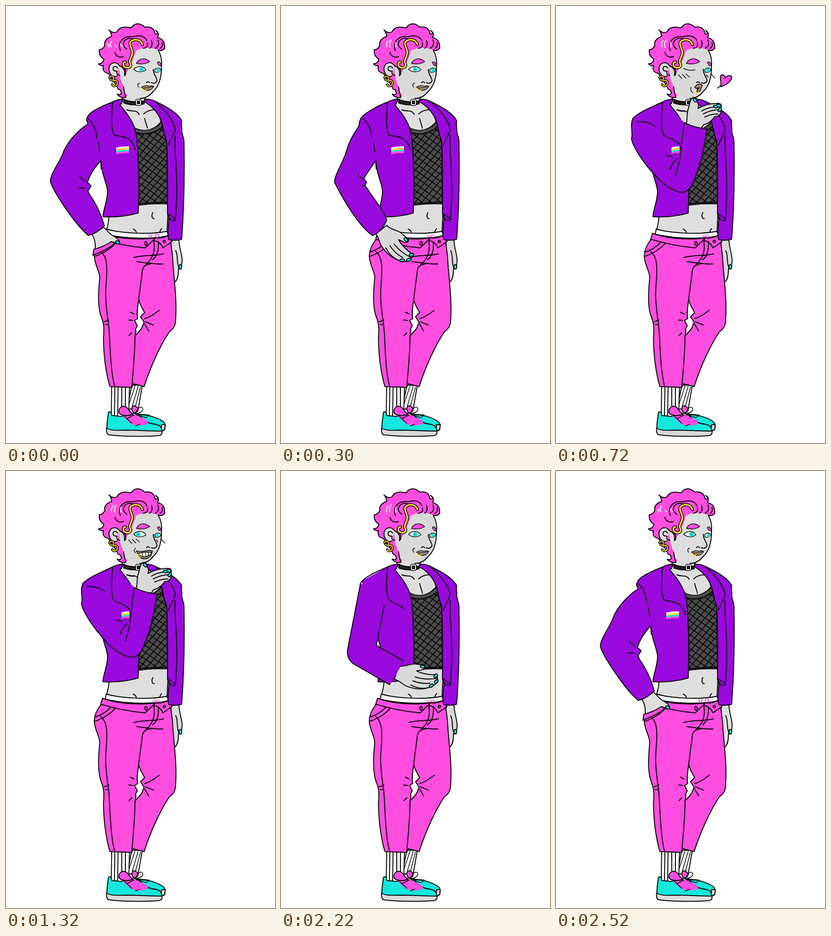
An HTML page for the animation above (2.88 s loop, 588 px wide and 952 px high).

```html
<!DOCTYPE html>
<html lang="en">
<head>
<meta charset="utf-8">
<title>Blown kiss</title>
<style>
html,body{margin:0;width:100%;height:100%;overflow:hidden;background:#fff}
svg{display:block;width:100vw;height:100vh}
text{font-family:"DejaVu Sans",Inter,sans-serif}
</style>
</head>
<body>
<svg id="stage" viewBox="0 0 588 952" fill="none" stroke="#000" stroke-width="2" stroke-linecap="round" stroke-linejoin="round"></svg>
<script>
const PINK = '#ff4de0', PURPLE = '#9a09dd', CYAN = '#12e8dc', GOLD = '#ffe32e', LIP = '#a08b72';
const LOOP = 2880, STEP = 60;
const THIN = 'stroke-width="1.5"', BARE = 'stroke="none"';
const stage = document.getElementById('stage');
let skin = '#d9d9d9';

const shape = (d, fill = 'none', extra = '') => `<path d="${d}" fill="${fill}" ${extra}/>`;
const flat = (d, fill) => shape(d, fill, BARE);
const dot = (x, y, rx, ry, fill, extra = '') => `<ellipse cx="${x}" cy="${y}" rx="${rx}" ry="${ry}" fill="${fill}" ${extra}/>`;
const nail = (x, y, a = 0) => dot(x, y, 5, 3, CYAN, `transform="rotate(${a} ${x} ${y})"`);
const gold = (d, w) => shape(d, 'none', `stroke="${GOLD}" stroke-width="${w}"`);
const cord = (d, w) => shape(d, 'none', `stroke-width="${w + 3}"`) + gold(d, w);
const group = (inner, transform) => `<g transform="${transform}">${inner}</g>`;

// Blend two paths that share the same commands
function mix(a, b, k) {
  const to = b.match(/-?[\d.]+/g);
  let i = 0;
  return a.replace(/-?[\d.]+/g, n => (+n + (to[i++] - n) * k).toFixed(1));
}

const SLEEVE = {
  hip: 'M231 210C215 216 182 230 178 242C172 252 182 252 178 258C160 268 132 298 124 322C115 345 97 365 97 382C102 402 150 475 180 500C192 497 205 489 215 479C207 450 193 425 183 411L179 403L186 392L178 384C184 365 195 350 207 337M160 371L173 382M158 396L172 397',
  out: 'M231 210C215 216 182 230 178 242C172 252 182 254 178 260C160 268 132 298 124 322C115 345 98 367 98 382C108 412 130 470 145 494C158 496 177 486 189 474C182 450 180 425 179 409L173 403L179 396L172 388C178 368 192 350 206 337M160 380L173 387M156 399L172 399',
  front: 'M231 210C215 216 184 232 176 243C170 250 172 256 170 262C150 290 145 310 140 325C130 350 117 370 117 384C135 420 170 480 200 500C212 496 225 482 231 466C222 440 198 415 189 398L183 392L187 384L181 376C190 360 200 348 207 337M168 369L183 379M175 391L184 391'
};

function legs() {
  let s = shape('M361 508L378 510C379 530 385 540 385 555L383 573L377 572C377 588 375 598 368 602L363 596C360 560 360 535 361 508ZM371 533C377 545 372 558 378 570', skin);
  s += dot(381, 568, 3, 5, CYAN);
  s += shape('M275 826L298 826L289 878L265 878Z', '#fff') + shape('M282 828L268 870M289 828L276 872M294 830L283 872', 'none', THIN);
  s += shape('M231 828L230 895L268 895L270 828Z', '#fff') + shape('M238 831L237 892M245 831L244 892M253 831L253 888M261 831L261 880');
  s += shape('M290 890C315 890 345 901 348 912L347 923L335 929L300 915Z', CYAN) + shape('M340 912L348 912L347 922L339 927Z', skin);
  s += shape('M224 885C229 883 231 884 231 892L250 894L290 891C304 906 313 910 326 911C337 913 342 919 340 928L221 926C219 910 223 896 224 885Z', CYAN);
  s += shape('M220 919C224 924 240 925 258 924C285 924 315 926 341 926C342 932 340 935 334 936C300 938 255 938 224 934C220 932 219 925 220 919Z', skin);
  s += flat('M250 888C270 888 285 889 296 897Q315 903 309 911Q290 917 275 911Q265 904 250 888Z', PINK);
  s += shape('M247 886C245 872 260 867 267 878C272 886 278 889 278 889C268 894 251 893 247 886ZM279 887C271 876 277 867 285 873C294 882 285 886 279 887Z', PINK);
  s += shape('M285 884C288 876 296 870 299 877C300 883 292 888 282 888M281 888L313 891L306 897ZM257 892L275 909M264 899L280 891M283 915L292 911', 'none', THIN);

  s += shape('M209 507C195 524 191 540 194 553C198 572 204 578 205 591C202 620 200 650 207 674C214 690 215 702 213 722C213 762 219 802 227 829L275 831L278 823L302 829C316 785 338 738 357 710C368 702 371 695 371 680C374 635 366 590 364 545L360 514L300 500Z', PINK);
  s += shape('M290 640C294 655 301 663 303 668L294 677L302 689L296 703L282 719C284 710 285 706 283 704L287 697L281 685L288 681C285 670 288 655 290 640Z', '#fff');
  s += shape('M207 535C227 550 219 590 218 620C216 650 225 690 226 715C228 760 230 800 237 827M282 719C282 760 277 800 275 831M318 561C305 564 299 567 298 577C296 595 292 620 290 640');
  s += shape('M279 548C300 542 325 545 344 540M286 557C305 559 325 563 343 562M272 667L280 671M268 684L277 685M269 718L275 712M303 681C320 676 327 668 335 663M305 688L322 695M303 693L312 708M215 688L225 684M217 694L225 694');
  return s + shape('M194 536C207 533 220 524 229 515M195 545C211 540 228 529 238 518');
}

function waist(rest) {
  let s = shape('M226 450C225 465 223 478 220 486C260 498 315 498 352 491L355 430L285 430Z', '#dedede');
  s += shape('M321 450C317 457 320 465 324 463M285 493Q283 488 278 486M336 493Q337 488 340 485');
  s += shape('M219 486C255 496 315 498 352 491L355 500C330 508 260 508 217 497Z', '#fff');
  s += `<text x="${rest ? 311 : 320}" y="506" font-size="${rest ? 13 : 10}" font-weight="bold" letter-spacing="${rest ? 4 : 0}" fill="${PINK}" stroke="none" transform="rotate(-5 325 504)">VO</text>`;
  s += shape('M211 495C245 508 295 510 326 505L320 512C314 517 310 522 304 527C268 524 237 517 207 508Z', PINK);
  s += shape('M326 505C338 507 348 503 354 500L363 513L343 527C339 518 334 513 323 511Z', PINK);
  s += shape('M323 511C326 530 324 548 306 563M333 513C334 530 331 546 320 553');
  return s + dot(306, 517, 2.5, 4, PINK) + dot(346, 513, 2.5, 2.5, PINK);
}

function torso() {
  const tank = 'M275 259C288 276 320 276 339 252L352 290L353 431C330 430 310 431 289 434Z';
  let net = '';
  for (let i = 0; i < 24; i++) net += `M${130 + i * 15} 442l165 -190M270 ${175 + i * 15}l100 72`;
  let s = shape('M257 180L252 213L240 220L275 275L345 275L330 220L304 208L304 185Z', '#dedede');
  s += shape('M264 226C275 231 286 225 291 236M301 235C308 228 316 226 326 226M303 245C305 254 308 260 309 266');
  s += `<clipPath id="tank"><path d="${tank}"/></clipPath>` + shape(tank, '#4c4c4c');
  s += `<g clip-path="url(#tank)">${shape(net, 'none', 'stroke-width="1.7"')}${shape('M273 263C288 281 324 278 343 256', 'none', 'stroke="#4c4c4c" stroke-width="7"')}${shape('M273 268C290 285 326 281 344 260M287 430L355 427')}</g>`;
  return s;
}

function jacket() {
  let s = shape('M303 203C318 202 325 207 337 213C355 222 377 236 384 250C382 260 386 266 384 273L389 292C390 340 390 430 384 508C375 511 362 511 355 508C353 494 355 480 356 463L353 453C353 400 354 340 351 294C345 280 343 262 340 252C333 234 321 219 303 209Z', PURPLE);
  s += shape('M325 207C347 226 365 246 370 268C367 282 360 290 355 303M370 282C367 310 374 350 373 390C374 420 372 445 370 466L365 468C358 465 354 460 354 453L368 462');
  s += flat('M231 210L180 240L190 290L207 337L260 340Z', PURPLE);
  s += shape('M207 337C208 365 222 388 222 405C221 428 212 445 212 459C240 461 268 457 289 451C291 400 290 340 287 300C286 280 281 262 275 252C269 238 257 226 249 215L258 203C249 203 238 206 231 210', PURPLE);
  return s;
}

const flag = () => ['#fff', GOLD, CYAN, PINK].map((c, i) => flat(`M241 ${308.5 + i * 3.6}Q255 ${305 + i * 3.6} 269 ${306 + i * 3.6}v3.8Q255 ${309 + i * 3.6} 241 ${312.3 + i * 3.6}Z`, c)).join('');

function hair() {
  return shape('M262 199Q249 201 243 192Q252 195 252 189Q251 182 245 181Q243 175 238 168L224 147Q209 144 213 130Q206 131 202 126Q212 126 214 116Q202 109 204 95Q211 96 216 86Q213 73 231 66Q230 57 225 52Q234 61 243 56Q249 43 269 47Q275 49 278 42Q291 34 303 46Q323 43 326 61Q335 62 327 53Q337 59 331 69Q348 72 347 92Q341 99 333 96', PINK);
}

function head(face, rest) {
  let s = hair();
  s += flat('M258 135L262 140L270 128L283 98Q300 88 325 93L333 97C340 108 341 120 340 132C340 157 334 175 322 186C313 197 303 202 293 201C280 199 268 195 260 191L257 176L250 158L247 132Z', skin);
  s += shape('M333 97C340 108 341 120 340 132C340 157 334 175 322 186C313 197 303 202 293 201M258 137Q260 145 259 152M262 199C260 192 258 185 257 176');
  s += shape('M248 130C240 119 226 123 225 137C226 150 235 157 243 152', skin) + shape('M249 151Q240 150 243 142Q231 142 235 133Q239 129 244 135M248 130Q255 133 258 139');
  s += flat('M284 97C280 112 276 121 272 128L261 150L258 135L265 110Z', PINK);
  s += shape('M250 97C243 82 254 63 278 67C291 63 304 65 308 76M257 110C246 114 240 108 238 101M281 73Q267 66 258 77Q253 87 264 94M314 92Q322 87 318 75M326 92Q337 87 332 74M337 92Q344 87 341 80M300 92Q312 91 309 80M258 133Q263 141 261 150');
  s += cord('M298 84C294 70 275 71 271 80C270 88 277 94 276 103C275 112 267 119 272 126C276 136 260 137 257 130Q255 122 261 122', 3.4);
  s += shape(rest ? 'M221 84Q226 83 224 90M231 77Q225 82 230 89M239 84Q238 89 242 89M251 82Q251 88 256 88' : 'M234 75Q229 82 231 89M241 74Q235 81 238 90M251 79Q249 84 252 89', 'none', 'stroke="#fff"');
  s += cord('M226 156C230 150 238 154 235 160Q231 163 228 160M234 164C240 159 246 164 243 171Q236 178 232 171', 2);

  s += shape('M285 125C291 113 304 112 314 121C306 127 295 127 285 125ZM331 123Q336 118 340 130Q334 132 331 123Z', PINK, THIN);
  s += eyes(face) + shape('M322 138C321 148 331 157 330 163Q326 171 318 167M307 167Q310 163 314 167');
  if (face.blush) s += shape('M268 150L275 158M276 149L284 157M284 148L292 155M340 149L347 157M329 150L332 155', 'none', THIN);
  return s + mouth(face.mouth);
}

function eyes({ eye, look }) {
  let s = '';
  if (eye === 'wink') s = shape('M279 136Q290 142 304 139', 'none', THIN);
  else if (eye === 'half') s = shape('M279 137Q292 133 305 138Q293 143 279 137Z', '#fff', THIN) + dot(289 + look, 138, 4, 2.5, CYAN, BARE);
  else s = shape('M279 138C287 129 300 130 306 139C298 145 287 145 279 138Z', '#fff', THIN) + dot(293 + look, 138, 5, 5, CYAN, BARE) + dot(293 + look, 138, 1.5, 1.5, '#087f86', BARE);
  s += shape('M325 139Q331 132 339 138Q336 146 326 144Z', '#fff', THIN);
  return s + dot(332 + look / 2, 140, 4, 4, CYAN, BARE);
}

function mouth(kind) {
  if (kind === 'kiss') return shape('M303 178C307 169 316 168 320 173L317 180Q316 187 309 188Q306 184 311 181Z', LIP, THIN) +
    shape('M295 177Q293 185 299 189M307 179L314 178', 'none', THIN) + gold('M305 186Q308 192 312 188', 2.5);
  if (kind === 'smile') return shape('M285 174C298 179 308 170 320 174C318 190 304 195 294 189Q290 185 285 174Z', LIP, THIN) +
    shape('M290 179Q305 176 318 177Q315 186 302 187Q293 186 290 179ZM298 179L299 186M305 178L306 186M311 178L311 184', '#fff', 'stroke-width="1.3"') +
    shape('M283 168Q277 173 283 178', 'none', THIN) + gold('M292 183Q286 182 287 188Q291 191 293 187', 2.5);
  return shape('M296 177Q306 171 313 175Q318 173 323 175C319 184 306 187 301 180Z', LIP, 'stroke-width="1.3"') +
    shape('M301 178Q311 179 321 176', 'none', 'stroke-width="1"') + shape('M292 168Q285 171 290 177', 'none', THIN) + gold('M298 180Q300 187 305 183', 2.5);
}

const choker = () => shape('M259 204C270 209 285 210 302 207L302 213C288 217 270 216 257 211Z', '#222') +
  '<rect x="285" y="205" width="9" height="10" rx="2" fill="#222" stroke-width="5"/><rect x="285" y="205" width="9" height="10" rx="2" stroke="#fff"/>';

// Open hand, wrist at 0,0
function openHand(x, y, angle) {
  const art = shape('M-12 8C-4 18 -4 27 0 34C8 47 22 61 36 65L46 69L60 68L66 61L70 54C58 46 44 33 38 21L51 27Q61 29 59 20L43 6C35 0 22 0 12 -10Z', skin) +
    shape('M19 34Q30 51 47 60M28 30Q41 48 65 60M10 39Q20 58 36 65') +
    nail(54, 21, 50) + nail(66, 54, -15) + nail(60, 65, -15) + nail(46, 66, 0);
  return group(art, `translate(${x} ${y}) rotate(${angle})`);
}

const hipHand = () => shape('M187 496C193 504 196 515 195 530L235 514Q243 521 248 515Q249 510 235 501C226 498 222 488 213 482Z', skin) + nail(244, 515, 30) +
  shape('M192 530C206 527 220 520 231 513L237 518C224 529 208 536 190 543Z', PINK);

const lapel = up => shape(up
  ? 'M233 210C231 235 228 262 235 280C245 289 262 290 270 302'
  : 'M233 210C231 235 228 265 236 281C252 287 274 279 283 314');

const loweredArm = ({ path, hand }) => hand + shape(path, PURPLE) +
  shape('M180 246C192 256 198 270 198 288M202 298L205 317M207 337L208 355') + flag() + lapel(false);

// Upper arm and forearm passing in front of the chest
function swingArm([ex, ey, wx, wy, angle]) {
  const d = `M203 252L${ex} ${ey}L${wx} ${wy}`;
  const tube = (c, w) => shape(d, 'none', `stroke="${c}" stroke-width="${w}" stroke-linecap="butt"`);
  return openHand(wx, wy, angle) + tube('#000', 62) + tube(PURPLE, 58) +
    flat('M231 210L176 240L186 275L245 300Z', PURPLE) + shape('M231 210C205 221 180 232 173 246') + lapel(true);
}

function raisedArm(toLips) {
  const wrist = 'M285 256C288 243 285 232 290 222C292 212 293 205 297 201';
  const end = 'L318 266C305 265 292 262 285 256Z';
  const hand = toLips
    ? shape(wrist + 'C301 193 309 200 306 207Q310 214 306 222C313 212 320 200 323 188Q325 174 333 180Q336 172 344 180Q351 178 349 193C348 222 340 243 329 256' + end, skin) +
      shape('M333 184Q332 202 325 215M341 184Q339 202 333 218M346 190Q345 207 339 222') +
      nail(298, 200, 55) + nail(326, 183, 100) + nail(336, 180, 95) + nail(342, 180, 95)
    : shape(wrist + 'C303 196 310 202 309 209Q314 217 310 223C324 216 340 212 352 212Q363 211 361 220L361 229Q360 240 347 241C339 252 331 257 322 259' + end, skin) +
      shape('M318 229Q331 221 347 220M322 235Q339 226 358 226M325 242Q339 235 354 235') +
      nail(304, 205, 45) + nail(349, 219, 10) + nail(356, 217, 20) + nail(358, 226, -50);
  const sleeve = 'M231 210C205 222 180 232 168 245C161 262 169 275 165 290C170 311 195 346 214 366C235 390 260 407 278 406C295 402 300 385 304 373C317 345 325 303 330 268C312 266 295 262 281 254';
  return hand + flat(sleeve + 'L231 210', PURPLE) + shape(sleeve) +
    shape('M281 254C277 278 274 300 272 320C271 340 266 355 261 369M265 333Q252 343 250 355M241 325L254 328M257 323L265 318M178 252Q198 250 216 262') +
    group(flag(), 'translate(105.6 0) scale(.61 1)') + lapel(true) + shape('M264 226Q273 231 281 228');
}

const heart = (x, y) => group(shape('M360 176C363 165 355 152 363 150Q370 150 370 158C374 149 386 150 384 157C382 165 372 172 360 176ZM353 179L361 173', PINK), `translate(${x} ${y})`);

// Each track entry: start time, value
const { hip, out, front } = SLEEVE;
const blendOut = k => () => loweredArm({ path: mix(front, out, k), hand: openHand(219 - 50 * k, 488 + 2 * k, 17 * k) });
const atHip = () => loweredArm({ path: hip, hand: hipHand() });
const leaving = () => loweredArm({ path: mix(out, hip, .6), hand: openHand(185, 492, -5) });
const raised = () => raisedArm(false), touching = () => raisedArm(true);
const lift = (...joints) => () => swingArm(joints);
const ARMS = [
  [0, atHip], [60, leaving], [120, blendOut(1.7)], [180, blendOut(1)], [300, blendOut(0)],
  [360, lift(175, 395, 253, 440, -35)], [420, lift(225, 380, 293, 326, -92)], [480, touching], [540, raised],
  [2040, touching], [2100, lift(235, 380, 299, 310, -100)], [2160, lift(205, 390, 286, 375, -68)],
  [2220, lift(175, 395, 253, 440, -35)], [2280, blendOut(0)], [2340, blendOut(1)],
  [2400, blendOut(1.7)], [2460, leaving], [2520, atHip]
];

const calm = { eye: 'open', look: 0, mouth: 'closed' };
const FACES = [
  [0, calm],
  [600, { eye: 'half', look: 2, mouth: 'closed', blush: true }],
  [660, { eye: 'wink', look: 0, mouth: 'kiss', blush: true }],
  [1200, { eye: 'half', look: 0, mouth: 'kiss', blush: true }],
  [1260, { eye: 'half', look: 0, mouth: 'smile', blush: true }],
  [1320, { eye: 'open', look: -4, mouth: 'smile', blush: true }],
  [2040, { eye: 'half', look: 0, mouth: 'smile', blush: true }],
  [2100, calm]
];
const HEARTS = [[0, null], [720, [0, 0]], [1200, [2, -10]], [1260, [5, -23]], [1320, null]];

const at = (track, t) => track.filter(([start]) => start <= t).pop()[1];

function draw(t) {
  const rest = t < 60 || t >= 2520;
  skin = rest ? '#dedede' : '#d9d9d9';
  const face = rest ? { ...calm, look: 3 } : at(FACES, t);
  const love = at(HEARTS, t);
  stage.innerHTML = legs() + waist(rest) + torso() + jacket() + head(face, rest) + choker() + at(ARMS, t)() + (love ? heart(...love) : '');
}

let shown = -1;
const begin = performance.now();
function tick() {
  const step = Math.floor(((performance.now() - begin) % LOOP) / STEP);
  if (step !== shown) draw((shown = step) * STEP);
  requestAnimationFrame(tick);
}
tick();
</script>
</body>
</html>
```
